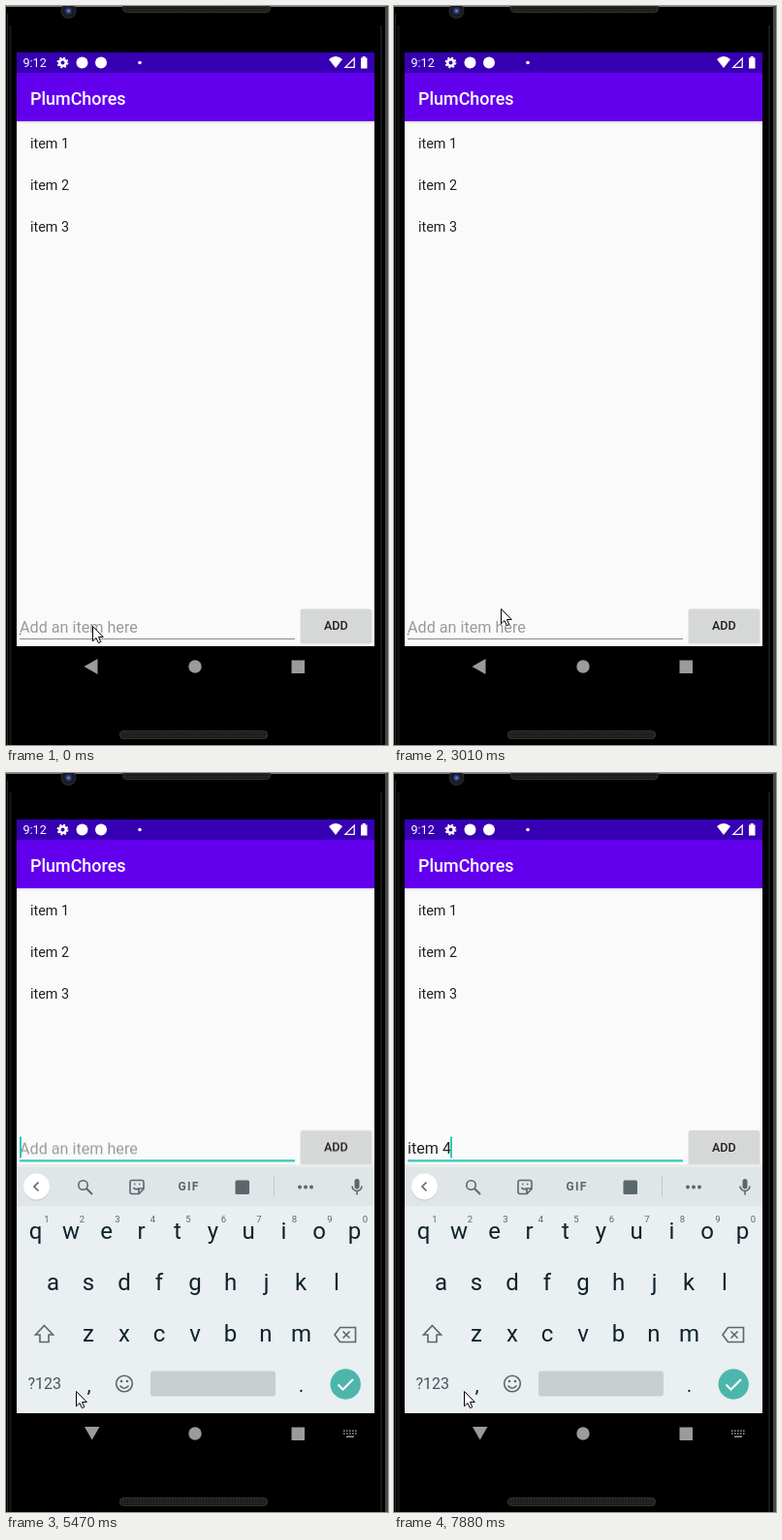
Animation, 394 px wide and 763 px high, one loop 8 s. Source, as an HTML page:

```html
<!DOCTYPE html>
<html lang="en">
<head>
<meta charset="utf-8">
<title>To-do list demo</title>
<style>
  html, body { margin: 0; width: 100%; height: 100%; overflow: hidden; background: #000; }
  svg { display: block; width: 394px; height: 763px; font-family: Roboto, sans-serif; }
  .mid { text-anchor: middle; }
  .medium { font-weight: 500; }
  .field { font-size: 16.16px; }
  .keys { font-size: 24px; fill: #0e232b; }
  .icon { fill: none; stroke: #5b676d; stroke-width: 1.6; }
  .solid { fill: #5b676d; }

  .pointer, .form, .focus, .hint, .caret, .caret-x, .compose, .ime, .no-ime, .reel {
    animation: 8s step-end infinite;
  }
  .pointer { animation-name: pointer; }
  .form { animation-name: form; }
  .focus { animation-name: focus; }
  .hint { animation-name: hint; }
  .caret { animation-name: blink; }
  .caret-x { animation-name: caret-x; }
  .compose { animation-name: compose; }
  .ime { animation-name: ime; }
  .no-ime { animation-name: no-ime; }
  .reel { animation-name: reel; }

  @keyframes pointer {
    0% { transform: translate(89px, 640px); }
    13.625% { transform: translate(87px, 642px); }
    15.25% { transform: translate(84px, 645px); }
    17.125% { transform: translate(26px, 475px); }
    19% { transform: translate(38px, 270px); }
    20.625% { transform: translate(59px, 122px); }
    22.125% { transform: translate(72px, 59px); }
    23.875% { transform: translate(87px, 38px); }
    25.375% { transform: translate(93px, 28px); }
    32.75% { transform: translate(99px, 59px); }
    34.625% { transform: translate(115px, 210px); }
    36.125% { transform: translate(119px, 480px); }
    37.625% { transform: translate(110px, 622px); }
    39.125% { transform: translate(90px, 651px); }
    41% { transform: translate(89px, 647px); }
    42.5% { transform: translate(88px, 643px); }
    44% { transform: translate(87px, 640px); }
    54.5% { transform: translate(74px, 640px); }
    58.125%, 100% { transform: translate(72px, 638px); }
  }
  @keyframes form {
    0% { transform: none; }
    68.375%, 100% { transform: translateY(-253.5px); }
  }
  @keyframes focus {
    0% { opacity: 0; }
    59.875% { opacity: .5; }
    61.375%, 100% { opacity: 1; }
  }
  @keyframes hint {
    0% { opacity: 1; }
    71.875%, 100% { opacity: 0; }
  }
  @keyframes blink {
    0% { opacity: 0; }
    59.875% { opacity: 1; }
    69.875% { opacity: 0; }
    71.875% { opacity: 1; }
    78.75% { opacity: 0; }
    80.5%, 100% { opacity: 1; }
  }
  @keyframes caret-x {
    0% { transform: translateX(14px); }
    71.875% { transform: translateX(17px); }
    73.375% { transform: translateX(22.4px); }
    80.5% { transform: translateX(31px); }
    85.625% { transform: translateX(45px); }
    90.5% { transform: translateX(49px); }
    95.5%, 100% { transform: translateX(58px); }
  }
  @keyframes compose {
    0% { opacity: 1; }
    90.5%, 100% { opacity: 0; }
  }
  @keyframes ime {
    0% { opacity: 0; }
    68.375%, 100% { opacity: 1; }
  }
  @keyframes no-ime {
    0% { opacity: 1; }
    68.375%, 100% { opacity: 0; }
  }
  @keyframes reel {
    0% { transform: none; }
    73.375% { transform: translateY(-40px); }
    82% { transform: translateY(-80px); }
    85.625% { transform: translateY(-120px); }
    90.5% { transform: translateY(-160px); }
    97%, 100% { transform: none; }
  }
</style>
</head>
<body>
<svg viewBox="0 0 394 763">
  <defs>
    <pattern id="mesh" width="3" height="3" patternUnits="userSpaceOnUse">
      <rect width="3" height="3" fill="#1b1b1a"/>
      <rect width="1.500" height="1.500" fill="#30302e"/>
    </pattern>
    <linearGradient id="shade" x2="0" y2="1">
      <stop stop-opacity=".12"/>
      <stop offset="1" stop-opacity="0"/>
    </linearGradient>
    <radialGradient id="lens">
      <stop stop-color="#7f91d8"/>
      <stop offset=".3" stop-color="#2a3768"/>
      <stop offset=".6" stop-color="#15171f"/>
      <stop offset="1" stop-color="#29292b"/>
    </radialGradient>
    <clipPath id="typed"><rect class="caret-x" x="-80" y="600" width="81" height="60"/></clipPath>
    <clipPath id="strip"><rect x="11" y="407" width="369" height="40"/></clipPath>
    <g id="split">
      <path d="M29 422.500l4.500 4.500l-4.500 4.500" class="icon"/>
      <path d="M140.500 416v22M248.500 416v22" stroke="#c5cbcf"/>
    </g>
  </defs>

  <!-- Phone body -->
  <rect width="394" height="763"/>
  <path d="M1.500 8V763" stroke="#292929"/>
  <path d="M4.500 20V763M387 20V763" stroke="#171717" stroke-width="2"/>
  <path d="M0 .5H394" stroke="#777"/>
  <rect x="391" width="3" height="763" fill="#484848"/>
  <circle cx="64.500" cy="5" r="8" fill="url(#lens)"/>
  <rect x="120.500" y="-4.500" width="152" height="11" rx="4" fill="url(#mesh)" stroke="#333"/>
  <rect x="117.500" y="748.500" width="152" height="8" rx="3.500" fill="url(#mesh)" stroke="#333"/>

  <!-- App -->
  <rect x="11" y="48" width="369" height="613" fill="#fafafa"/>
  <rect x="11" y="119" width="369" height="3" fill="url(#shade)"/>
  <rect x="11" y="69" width="369" height="50" fill="#6200ee"/>
  <rect x="11" y="48" width="369" height="21" fill="#3700b3"/>
  <g fill="#fff">
    <text x="17.500" y="63" font-size="12.570">9:12</text>
    <g fill="none" stroke="#fff">
      <circle cx="58.500" cy="58.500" r="3.300" stroke-width="2.600"/>
      <circle cx="58.500" cy="58.500" r="5" stroke-width="1.800" stroke-dasharray="2 1.927"/>
    </g>
    <circle cx="78.500" cy="58.500" r="6"/>
    <circle cx="98" cy="58.500" r="6"/>
    <circle cx="138" cy="58.500" r="1.800"/>
    <path d="M333 55Q340 49 347 55L340 64Z"/>
    <path d="M349.800 63.400L359.200 54V63.400Z" fill="none" stroke="#fff" stroke-width="1.300"/>
    <path d="M366 53.500h1.700v-1.500h3v1.500h1.800v11H366Z"/>
    <text x="25" y="101.500" font-size="17.960" class="medium">PlumChores</text>
  </g>
  <g font-size="14.370" fill="#212121">
    <text x="25" y="146.500">item 1</text>
    <text x="25" y="189.500">item 2</text>
    <text x="25" y="232.500">item 3</text>
  </g>

  <g class="form">
    <text x="14" y="646.500" class="field hint" fill="#9a9a9a">Add an item here</text>
    <g clip-path="url(#typed)">
      <text x="14" y="646.500" class="field" fill="#212121">item 4</text>
      <path d="M14 648.500H46" stroke="#333" class="compose"/>
    </g>
    <path d="M14 653.500H298" stroke="#8a8a8a"/>
    <rect x="14" y="653" width="284" height="2" fill="#2cd0c0" class="focus"/>
    <g class="caret"><rect y="629" width="2" height="22" fill="#2cc9b9" class="caret-x"/></g>
    <rect x="303.500" y="623" width="74" height="35.500" rx="2" fill="#000" opacity=".13"/>
    <rect x="304" y="622.500" width="73" height="34.500" rx="2" fill="#d6d7d7"/>
    <text x="340.300" y="644" font-size="12.570" class="mid medium" fill="#212121">ADD</text>
  </g>

  <!-- Keyboard -->
  <g class="ime">
    <rect x="11" y="404" width="369" height="3" fill="#e9ebec"/>
    <rect x="11" y="407" width="369" height="254" fill="#eaeff1"/>
    <rect x="11" y="407" width="369" height="40" fill="#e0e5e8"/>
    <circle cx="31.500" cy="427.800" r="13.600" fill="#000" opacity=".12"/>
    <circle cx="31.500" cy="427" r="13.500" fill="#fff"/>

    <g clip-path="url(#strip)">
      <g class="reel">
        <g class="icon">
          <path d="M33.500 422.500l-4.500 4.500l4.500 4.500"/>
          <circle cx="79.500" cy="425.500" r="4.700"/>
          <path d="M83 429l6 6" stroke-width="2"/>
          <path d="M130 420.500h10q2 0 2 2v7l-5 5h-7q-2 0-2-2v-10q0-2 2-2ZM137 434v-5h5M131.500 428q2 3 5 1M132 424.500h1.500M137 424.500h1.500"/>
          <circle cx="303" cy="427.500" r="2" class="solid" stroke="none"/>
          <circle cx="309" cy="427.500" r="2" class="solid" stroke="none"/>
          <circle cx="315" cy="427.500" r="2" class="solid" stroke="none"/>
        </g>
        <text x="188.500" y="431.300" class="mid solid" font-size="12" font-weight="700" letter-spacing="1.200">GIF</text>
        <rect x="236.500" y="420.500" width="14.500" height="14.500" rx="1.500" class="solid"/>
        <path d="M276.500 416v22" stroke="#c5cbcf"/>
        <use href="#split" y="40"/>
        <use href="#split" y="80"/>
        <use href="#split" y="120"/>
        <use href="#split" y="160"/>
        <g class="field mid solid">
          <text y="473"><tspan x="92">it</tspan><tspan x="194">it's</tspan><tspan x="296">its</tspan></text>
          <text y="513"><tspan x="92">ite</tspan><tspan x="194">item</tspan><tspan x="296">ire</tspan></text>
          <text y="553"><tspan x="92">item</tspan><tspan x="194">items</tspan><tspan x="296">itemized</tspan></text>
          <text y="593"><tspan x="92">is</tspan><tspan x="194">in</tspan><tspan x="296">for</tspan></text>
        </g>
      </g>
    </g>
    <rect x="359.500" y="419" width="5" height="10.500" rx="2.500" class="solid"/>
    <path d="M357 426.500a5 5 0 0 0 10 0M362 431.500v4" class="icon"/>

    <g class="keys mid">
      <text y="481" x="30.500 67 103.500 139.500 177 213.500 250 286.500 323 359.500">qwertyuiop</text>
      <text y="533.500" x="48.500 85 122 158 195 231.500 268.500 304 341">asdfghjkl</text>
      <text y="586.500" x="85 122 158 195 231.500 268 304.500">zxcvbnm</text>
      <text y="639" x="85.500 304.500" font-size="21">,.</text>
      <text y="463.500" x="42 78.500 115 151.500 188 224.500 261 297.500 334 370.500" font-size="9.500" fill="#5b676d">1234567890</text>
      <text y="636" x="39.800" font-size="16" fill="#46545b">?123</text>
    </g>
    <g class="icon">
      <path d="M39.500 570.500l9 9.500h-4.500v7.500h-9v-7.500h-4.500Z"/>
      <path d="M344.500 572.500h16v15h-16l-5.500-7.500ZM347.500 576.500l7 7M354.500 576.500l-7 7"/>
      <circle cx="122" cy="630.500" r="8.300"/>
      <path d="M117.500 632.500q4.500 5.500 9 0"/>
    </g>
    <circle cx="119" cy="628" r="1.300" class="solid"/>
    <circle cx="125" cy="628" r="1.300" class="solid"/>
    <rect x="149" y="617.500" width="129" height="26" rx="3" fill="#c9ced1"/>
    <circle cx="350.200" cy="631" r="15.700" fill="#4db6ac"/>
    <path d="M342.500 631.500l5 5l10.500-10.500" fill="none" stroke="#fff" stroke-width="2"/>
  </g>

  <!-- Navigation bar -->
  <g fill="#9b9b9b">
    <path d="M80.500 682L94.500 674V690Z" class="no-ime"/>
    <path d="M81 675H96.500L88.700 688.500Z" class="ime"/>
    <circle cx="195" cy="682" r="6.700"/>
    <rect x="294.500" y="675.500" width="13.500" height="13.500"/>
    <g class="ime" stroke="#9b9b9b" stroke-width="1.500">
      <path d="M348 679.200H362M348 682H362" stroke-dasharray="1.600 1.400"/>
      <path d="M351 685.200H359"/>
    </g>
  </g>

  <path class="pointer" d="M.5 .5V15.800L4 12.500L6.400 17.700L8.800 16.600L6.500 11.500H11.300Z" fill="#fff" stroke="#000"/>
</svg>
</body>
</html>
```
